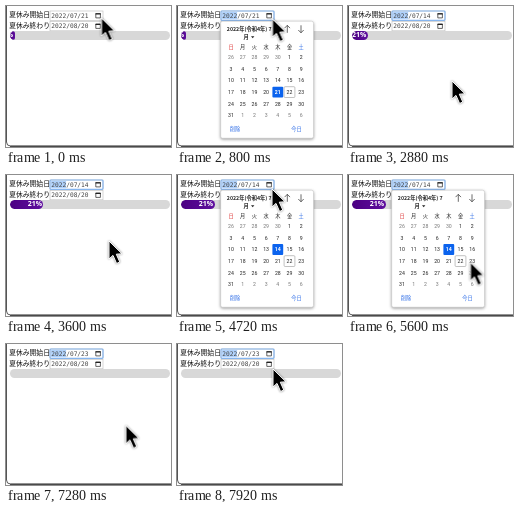
An HTML page that plays this animation: 165 px wide and 141 px high, repeating every 8 s.

```html
<!DOCTYPE html>
<html lang="ja">
<head>
<meta charset="utf-8">
<title>夏休み</title>
<style>
html, body { margin: 0; width: 100%; height: 100%; overflow: hidden; background: #fff; }
svg { position: absolute; left: 0; top: 0; width: 165px; height: 141px; }
text { font-family: "Noto Sans CJK JP", "Noto Sans CJK", sans-serif; }
.label { font-size: 6.8px; fill: #111; }
.date { font: 6.2px "DejaVu Sans Mono", monospace; fill: #444; }
.bar { position: absolute; left: 3.5px; top: 25px; width: 160px; height: 8.5px; border-radius: 5px; background: #d8d8d8; overflow: hidden; }
.fill { position: relative; height: 100%; border-radius: 5px; overflow: hidden; background: linear-gradient(90deg, #4b0082, #5f0f9f); color: #fff; font: bold 7px/8.5px "Open Sans", "Noto Sans", sans-serif; }
.fill span { position: absolute; right: 1.5px; top: 0; white-space: nowrap; }
.days text, .foot { font: 5.2px Roboto, "Noto Sans CJK JP", sans-serif; text-anchor: middle; fill: #222; }
.days .out { fill: #777; }
.days .sun { fill: #d33; }
.days .sat, .foot { fill: #2a6ae6; }
.days .picked { fill: #fff; font-weight: bold; }
.title { font-size: 5.25px; font-weight: bold; fill: #222; }

.first, .second, .third, .popup, .focus { animation: 8s step-end infinite; }
.first { animation-name: first; }
.second { animation-name: second; }
.third { animation-name: third; }
.popup { animation-name: popup; }
.focus { animation-name: focus; }
.fill { animation: fill 8s ease infinite; }
.cursor { animation: cursor 8s ease-in-out infinite; }

@keyframes first { 0% { visibility: visible } 33%, 100% { visibility: hidden } }
@keyframes second { 0% { visibility: hidden } 33% { visibility: visible } 78%, 100% { visibility: hidden } }
@keyframes third { 0% { visibility: hidden } 78%, 100% { visibility: visible } }
@keyframes popup { 0% { opacity: 0 } 8% { opacity: 1 } 33% { opacity: 0 } 57% { opacity: 1 } 78%, 100% { opacity: 0 } }
@keyframes focus { 0% { visibility: hidden } 8%, 100% { visibility: visible } }
@keyframes fill {
  0%, 33% { width: 5px }
  45.5%, 78% { width: 34px }
  90.5%, 100% { width: 0 }
}
@keyframes cursor {
  0% { transform: translate(95.5px, 12px) }
  10%, 16% { transform: translate(95.5px, 13px) }
  20% { transform: translate(101.5px, 37.5px); animation-timing-function: ease-out }
  27%, 42.5% { transform: translate(104px, 75px) }
  45% { transform: translate(103px, 66px) }
  54%, 61% { transform: translate(95px, 14px) }
  71%, 89% { transform: translate(123px, 89px) }
  97.5%, 100% { transform: translate(96px, 25px) }
}
</style>
</head>
<body>
<svg viewBox="0 0 165 141">
  <defs>
    <g id="field">
      <rect x="44" y="5" width="53" height="9.3" fill="#fff" stroke="#bbb" stroke-width=".6"/>
      <path d="M89.8 7.6h4.6v4.3h-4.6z" fill="none" stroke="#222" stroke-width=".7"/>
      <path d="M89.5 7.9h5.2" stroke="#222" stroke-width="1.2"/>
    </g>
  </defs>
  <text class="label" x="3.2" y="11.3">夏休み開始日</text>
  <text class="label" x="3.2" y="22.1">夏休み終わり</text>
  <use href="#field"/>
  <use href="#field" y="10.5"/>
  <g class="focus">
    <rect x="44" y="5" width="53" height="9.3" rx="1" fill="none" stroke="#86b5ee" stroke-width="1.2"/>
    <rect x="45.1" y="6" width="15" height="7.3" fill="#b0d2fc"/>
  </g>
  <text class="date first" x="45.3" y="11.7">2022/07/21</text>
  <text class="date second" x="45.3" y="11.7">2022/07/14</text>
  <text class="date third" x="45.3" y="11.7">2022/07/23</text>
  <text class="date" x="45.3" y="22.2">2022/08/20</text>
  <path d="M.5 0V136Q.5 140 4.5 140H165" fill="none" stroke="#555"/>
  <path d="M4 140.3H165" stroke="#333"/>
</svg>

<div class="bar"><div class="fill">
  <span class="first">3%</span><span class="second">21%</span><span class="third">0%</span>
</div></div>

<svg viewBox="0 0 165 141">
  <g class="popup">
    <rect x="43.7" y="15.2" width="92.8" height="117" rx="2" fill="#fff" stroke="#c4c4c4" stroke-width=".5" style="filter: drop-shadow(0 1px 1.5px #0006)"/>
    <text class="title" x="49.8" y="25">2022年(令和4年) 7</text>
    <text class="title" x="66.5" y="33.2">月</text>
    <path d="M74 30.2h3.4l-1.7 2z" fill="#222"/>
    <path d="M110.3 26.8v-7.5m-2.7 2.8l2.7-2.8 2.7 2.8M124 19.3v7.5m-2.7-2.8l2.7 2.8 2.7-2.8" fill="none" stroke="#444" stroke-width=".8"/>
    <g class="days" id="days"></g>
    <text class="foot" x="58" y="124.6">削除</text>
    <text class="foot" x="119.5" y="124.6">今日</text>
  </g>
  <path class="cursor" d="M0 0V18L4 14.4 7.6 22.5 10.8 21 7.3 13.2 13 12.8Z" stroke="#fff" stroke-width="1" stroke-linejoin="round" style="filter: drop-shadow(0 .7px .8px #0007)"/>
</svg>

<script>
const days = document.getElementById("days");
const colX = col => 54 + col * 11.7;
const rowY = row => 51.3 + row * 11.6;

function add(parent, name, attrs, text = "") {
  const node = document.createElementNS("http://www.w3.org/2000/svg", name);
  for (const key in attrs) node.setAttribute(key, attrs[key]);
  node.textContent = text;
  return parent.appendChild(node);
}

function square(parent, col, row, attrs) {
  add(parent, "rect", { x: colX(col) - 5.4, y: rowY(row) - 5.4, width: 10.8, height: 10.8, rx: 1, ...attrs });
}

function label(parent, col, row, text, style) {
  add(parent, "text", { x: colX(col), y: rowY(row) + 1.9, class: style }, text);
}

[..."日月火水木金土"].forEach((name, col) =>
  label(days, col, -0.9, name, ["sun", , , , , , "sat"][col] || ""));

for (let i = 0; i < 42; i++) {
  const date = new Date(2022, 5, 26 + i);
  label(days, i % 7, Math.floor(i / 7), date.getDate(), date.getMonth() === 6 ? "" : "out");
}

// Today is outlined; the chosen day is filled.
square(days, 5, 3, { fill: "none", stroke: "#999", "stroke-width": 0.6 });
for (const [phase, row, day] of [["first", 3, 21], ["second", 2, 14]]) {
  const group = add(days, "g", { class: phase });
  square(group, 4, row, { fill: "#0b63ee" });
  label(group, 4, row, day, "picked");
}
</script>
</body>
</html>
```
